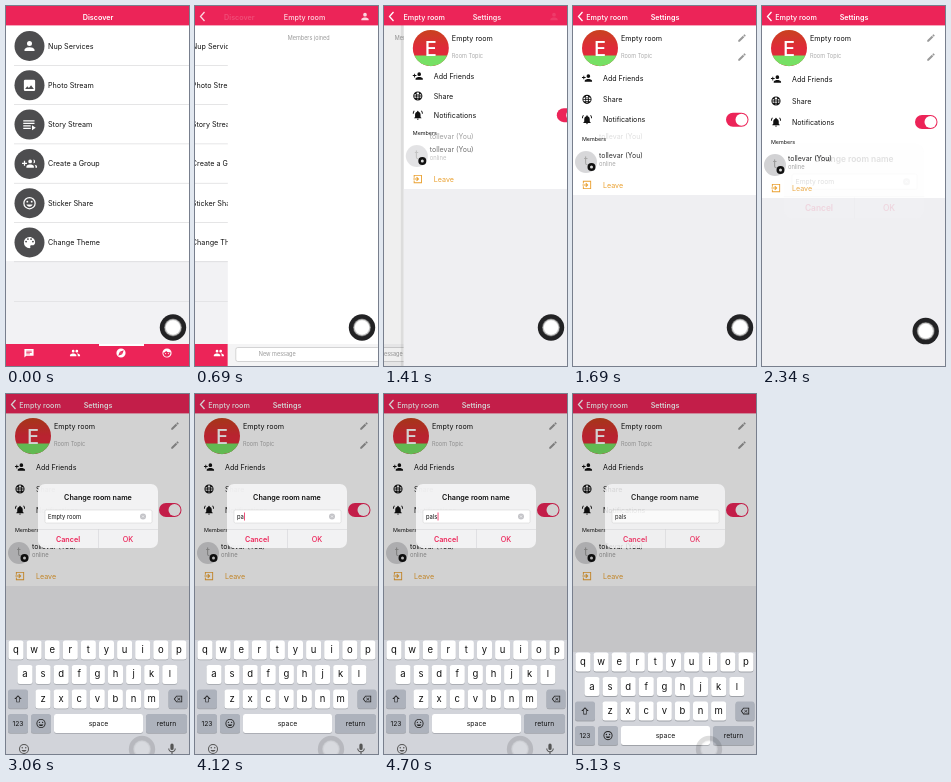
An HTML page for the animation above (5160 ms loop, 183 by 360 pixels).

```html
<!DOCTYPE html>
<html lang="en">
<head>
<meta charset="utf-8">
<title>Room settings</title>
<style>
html, body { margin: 0; width: 100%; height: 100%; overflow: hidden; background: #fff; }
svg { display: block; width: 100vw; height: 100vh; font-family: Inter, "Liberation Sans", sans-serif; }
</style>
</head>
<body>
<svg id="stage" viewBox="0 0 183 360"></svg>
<script>
const PINK = '#ec2458', LOOP = 5160;
const MEMBER = 'tollevar (You)';

// Icons on a 24-unit grid
const ICONS = {
  person: 'M12 12a4 4 0 100-8 4 4 0 000 8zm0 2c-2.7 0-8 1.3-8 4v2h16v-2c0-2.7-5.3-4-8-4z',
  image: 'M21 19V5a2 2 0 00-2-2H5a2 2 0 00-2 2v14a2 2 0 002 2h14a2 2 0 002-2zM8.5 13.5l2.5 3 3.5-4.5 4.5 6H5z',
  list: 'M2 5h18v2H2zM2 9h18v2H2zM2 13h12v2H2zM2 17h12v2H2zM16 13l6 4-6 4z',
  groupAdd: 'M8 10H5V7H3v3H0v2h3v3h2v-3h3zM13 11a3 3 0 100-6 3 3 0 000 6zm0 2c-2 0-6 1-6 3v2h12v-2c0-2-4-3-6-3zM18 11a3 3 0 000-6c1.3 2 1.3 4 0 6zm2 2.5c1 .7 1.5 1.5 1.5 2.5v2H24v-2c0-1.3-2-2.2-4-2.5z',
  smile: 'M12 2a10 10 0 100 20 10 10 0 000-20zm0 18a8 8 0 110-16 8 8 0 010 16zM8.5 11a1.5 1.5 0 100-3 1.5 1.5 0 000 3zm7 0a1.5 1.5 0 100-3 1.5 1.5 0 000 3zM12 17.5c2.3 0 4.3-1.5 5-3.5H7c.8 2 2.7 3.5 5 3.5z',
  palette: 'M12 3a9 9 0 000 18c.8 0 1.5-.7 1.5-1.5 0-1-1-1.5 0-2.5.3-.3.6-.5 1-.5H16a5 5 0 005-5c0-4.7-4-8.500-9-8.500zM6.5 12a1.5 1.5 0 110-3 1.5 1.5 0 010 3zm3-4a1.5 1.5 0 110-3 1.5 1.5 0 010 3zm5 0a1.5 1.5 0 110-3 1.5 1.5 0 010 3zm3 4a1.5 1.5 0 110-3 1.5 1.5 0 010 3z',
  chat: 'M2 3h20v15H6l-4 4zM6 7h12v1.5H6zM6 10h12v1.5H6zM6 13h8v1.5H6z',
  people: 'M8 11a3 3 0 100-6 3 3 0 000 6zm8 0a3 3 0 100-6 3 3 0 000 6zM8 13c-2.3 0-7 1.2-7 3.5V19h14v-2.5C15 14.2 10.3 13 8 13zm8 0c1.3 1 2 2 2 3.5V19h5v-2.5c0-2.3-4.7-3.5-7-3.5z',
  compass: 'M12 2a10 10 0 100 20 10 10 0 000-20zM6 18l3.5-8.5L18 6l-3.5 8.5zM12 11a1 1 0 100 2 1 1 0 000-2z',
  face: 'M12 2a10 10 0 100 20 10 10 0 000-20zm0 18a8 8 0 01-8-9c3 0 5-2 6-4 2 3 5 4 9.5 3.5A8 8 0 0112 20zM9 12a1.3 1.3 0 100 2.6A1.3 1.3 0 009 12zm6 0a1.3 1.3 0 100 2.6 1.3 1.3 0 000-2.6z',
  pencil: 'M3 17.5V21h3.5L17.5 10 14 6.5zM20.500 7a1 1 0 000-1.4l-2-2a1 1 0 00-1.5 0L15 5.500 18.500 9z',
  personAdd: 'M15 12a4 4 0 100-8 4 4 0 000 8zm-9-2V7H4v3H1v2h3v3h2v-3h3v-2zm9 4c-2.7 0-8 1.3-8 4v2h16v-2c0-2.7-5.3-4-8-4z',
  globe: 'M12 2a10 10 0 100 20 10 10 0 000-20zM5 8h3v3H4zm5-3.5h4L15 8H9zM10 11V9.5h4V11zM16 8h3l1 3h-4zM4 13h4l1 3H5zm6 0h4v3h-4zm6 0h4l-1 3h-3zm-6 5h4l-2 2z',
  bell: 'M12 22a2 2 0 002-2h-4a2 2 0 002 2zm6-6v-5c0-3-1.6-5.6-4.5-6.3V4a1.5 1.5 0 00-3 0v.7C7.6 5.4 6 8 6 11v5l-2 2v1h16v-1zM5 3L3.5 2C1.8 4 1 6 1 9h2c0-2.5.6-4.3 2-6zM19 3l1.5-1C22.2 4 23 6 23 9h-2c0-2.5-.6-4.3-2-6z',
  exit: 'M3 3h18v18H3v-6h2v4h14V5H5v4H3zM10 7l5 5-5 5-1.5-1.5L11 13H2v-2h9L8.5 8.5z',
  mic: 'M12 14a3 3 0 003-3V5a3 3 0 00-6 0v6a3 3 0 003 3zm5-3a5 5 0 01-10 0H5c0 3.5 2.5 6.5 6 7v3h2v-3c3.500-.5 6-3.500 6-7z',
  shift: 'M12 3L3 12h5v8h8v-8h5zM12 5.8L16.5 10.5H14.5V18.5h-5v-8H7.5z',
  erase: 'M8 4h14v16H8l-6-8zM9 6l-4.5 6L9 18h11V6zM11 8.5l3 3 3-3 1 1-3 2.7 3 2.8-1 1-3-3-3 3-1-1 3-2.8-3-2.7z'
};

const icon = (name, x, y, size, fill) =>
  `<path d="${ICONS[name]}" fill="${fill}" fill-rule="evenodd" transform="translate(${x - size / 2} ${y - size / 2}) scale(${size / 24})"/>`;
const text = (s, x, y, size = 7.2, fill = '#111', more = '') =>
  `<text x="${x}" y="${y + size * .36}" font-size="${size}" fill="${fill}" ${more}>${s}</text>`;
const mid = (s, x, y, size, fill, weight = 400, more = '') =>
  text(s, x, y, size, fill, `text-anchor="middle" font-weight="${weight}" ${more}`);
const rect = (x, y, w, h, fill, r = 0, more = '') =>
  `<rect x="${x}" y="${y}" width="${w}" height="${h}" rx="${r}" fill="${fill}" ${more}/>`;
const disc = (x, y, r, fill) => `<circle cx="${x}" cy="${y}" r="${r}" fill="${fill}"/>`;
const group = (id, body) => `<g id="${id}">${body}</g>`;

function discoverPage() {
  const rows = [['person', 'Nup Services'], ['image', 'Photo Stream'], ['list', 'Story Stream'],
    ['groupAdd', 'Create a Group'], ['smile', 'Sticker Share'], ['palette', 'Change Theme']];
  const tabs = ['chat', 'people', 'compass', 'face'];
  return rect(0, 0, 183, 360, '#f2f2f4') + rect(0, 19, 183, 236, '#fff') +
    rows.map(([name, label], i) => {
      const y = 40 + i * 39.3;
      return disc(23.5, y, 15, '#4d4d4f') + icon(name, 23.5, y, 15, '#fff') + text(label, 42, y) +
        rect(8, y + 19, 175, .6, '#d4d4d6');
    }).join('') + rect(8, 295, 175, .6, '#dcdcde') +
    rect(0, 338, 183, 22, PINK) + rect(93, 338, 45, 2, '#fff') +
    tabs.map((name, i) => icon(name, 23 + i * 46, 347, 11, '#fff')).join('');
}

const chatPage = () => rect(0, 0, 183, 360, '#fff') +
  text('Members joined', 60, 32, 5.5, '#999') +
  rect(0, 338, 183, 22, '#f4f4f5') +
  rect(8, 341.5, 144, 14, '#fff', 2, 'stroke="#bbb" stroke-width=".6"') +
  text('New message', 31, 348.5, 5.5, '#999') + icon('mic', 168, 348, 11, '#777') +
  rect(0, 0, 183, 360, '#000', 0, 'id="chatShade"');

function settingsPage() {
  const item = (y, body) => `<g class="item" data-y="${y}">${body}</g>`;
  const action = (name, label, y, fill) => item(y, icon(name, 14, y, 11, fill || '#111') + text(label, 30, y, 7.1, fill));
  return '<linearGradient id="rust" x2="0" y2="1"><stop stop-color="#c8421e"/><stop offset=".5" stop-color="#e02a3a"/></linearGradient>' +
    rect(-3, 19, 3, 341, '#000', 0, 'opacity=".08"') + rect(0, 0, 183, 360, '#fff') +
    item(192, rect(0, 192, 183, 178, '#efeff2')) +
    disc(27, 42, 18, 'url(#rust)') + '<path d="M10.5 49.500A18 18 0 0 0 43.5 49.500z" fill="#76e064"/>' +
    mid('E', 27, 42.5, 20, '#fff', 500) +
    text('Empty room', 48, 32) + text('Room Topic', 48, 50, 5.6, '#aaa') +
    icon('pencil', 169, 32, 10, '#999') + icon('pencil', 169, 51, 10, '#999') +
    action('personAdd', 'Add Friends', 73) + action('globe', 'Share', 95) + action('bell', 'Notifications', 116) +
    item(116, rect(153, 109, 22.5, 14, PINK, 7) + disc(168.5, 116, 6, '#fff')) +
    item(136, text('Members', 9, 136, 5.4)) +
    text(MEMBER, 26, 130, 7, '#777', 'id="ghost"') +
    item(152, group('member', disc(13, 159, 11, '#d2d2d4') + mid('t', 13, 158, 12, '#999') +
      text(MEMBER, 26, 152, 7) + text('online', 26, 161, 5.8, '#999')) +
      disc(18.5, 164, 4, '#111') + disc(18.5, 164, 1.5, '#ddd')) +
    action('exit', 'Leave', 182, '#eaa02f');
}

const header = () => rect(0, 0, 183, 19.4, PINK) +
  group('chevron', '<path d="M9.5 6L5.5 10.5L9.5 15" fill="none" stroke="#fff" stroke-width="1.3"/>') +
  mid('Discover', 0, 11, 7.2, '#fff', 600, 'id="discoverTitle"') +
  mid('Empty room', 0, 11, 7.2, '#fff', 500, 'id="chatTitle"') +
  mid('Settings', 0, 11, 7.2, '#fff', 600, 'id="settingsTitle"') +
  group('chatAction', icon('person', 170, 10.5, 11, '#fff'));

const dialog = () => rect(32, 90, 120, 64, '#f3f3f4', 7, 'opacity=".97"') +
  mid('Change room name', 92, 103, 7.2, '#111', 600) +
  rect(39, 116, 107, 13, '#fff', 1.5, 'stroke="#ccc" stroke-width=".5"') +
  text('', 42, 122.5, 5.8, '#111', 'id="field"') +
  rect(0, 118.5, .8, 8, PINK, 0, 'id="caret"') +
  group('clear', disc(137, 122.5, 3, '#c4c4c8') +
    '<path d="M136 121.5l2 2m0-2l-2 2" stroke="#fff" stroke-width=".6"/>') +
  rect(32, 135, 120, .5, '#cfcfd2') + rect(92, 135, .5, 19, '#cfcfd2') +
  mid('Cancel', 62, 145, 7.2, PINK, 600) + mid('OK', 122, 145, 7.2, PINK, 500);

function keyboard() {
  const GREY = '#adb2bc';
  const key = (x, y, w, fill, label) => rect(x - w / 2, y - 8.7, w, 19, '#a0a3a9', 2.5) +
    rect(x - w / 2, y - 9.5, w, 19, fill, 2.5) + label;
  const letters = (row, x, y) => [...row].map((c, i) =>
    key(x + i * 18.1, y, 15, '#fff', mid(c, x + i * 18.1, y - .5, 9.5, '#111'))).join('');
  return rect(0, 246, 183, 134, '#d2d4da') +
    letters('qwertyuiop', 10, 256) + letters('asdfghjkl', 19, 280.5) + letters('zxcvbnm', 37, 305) +
    key(12, 305, 20, GREY, icon('shift', 12, 305, 10, '#222')) +
    key(172, 305, 19, GREY, icon('erase', 172, 305, 10, '#222')) +
    key(12, 329.5, 20, GREY, mid('123', 12, 329.5, 6.8, '#111')) +
    key(35, 329.5, 20, GREY, icon('smile', 35, 329.5, 11, '#222')) +
    key(92.5, 329.5, 89, '#fff', mid('space', 92.5, 329.5, 6.8, '#111')) +
    key(160.5, 329.5, 41, GREY, mid('return', 160.5, 329.5, 6.8, '#111')) +
    icon('smile', 18, 355, 12, '#555') + icon('mic', 166, 355, 13, '#555');
}

const touchButton = () => disc(0, 0, 13.2, '#222224') + disc(0, 0, 9, '#666') +
  disc(0, 0, 8.3, '#ccc') + disc(0, 0, 7.2, '#fff');

const stage = document.getElementById('stage');
stage.innerHTML = group('discover', discoverPage()) + group('chat', chatPage()) +
  group('settings', settingsPage()) + group('header', header()) +
  rect(0, 0, 183, 360, '#000', 0, 'id="dim"') + group('dialog', dialog()) +
  group('keyboard', keyboard()) + group('touch', touchButton());

const el = {};
stage.querySelectorAll('[id]').forEach(node => el[node.id] = node);
const items = [...stage.querySelectorAll('.item')];

const ramp = (t, from, to) => Math.min(1, Math.max(0, (t - from) / (to - from)));
const easeOut = p => 1 - (1 - p) ** 2;
const mix = (a, b, p) => a + (b - a) * p;
const move = (node, x, y = 0) => node.setAttribute('transform', `translate(${x} ${y})`);
const fade = (node, value) => node.setAttribute('opacity', value);

// Field contents, each from its start time on
const TYPING = [[0, 'Empty room'], [3280, ''], [3770, 'p'], [4050, 'pa'], [4340, 'pal'], [4700, 'pals']];

function draw(t) {
  const toChat = easeOut(ramp(t, 420, 890));
  const toSettings = easeOut(ramp(t, 1120, 1552));
  const settle = easeOut(ramp(t, 1480, 1980));

  move(el.discover, -55 * toChat);
  move(el.chat, 183 * (1 - toChat) - 55 * toSettings);
  move(el.settings, 186 * (1 - toSettings));
  fade(el.chatShade, .07 * toSettings);

  move(el.discoverTitle, mix(92, 34, toChat));
  fade(el.discoverTitle, 1 - toChat);
  move(el.chatTitle, mix(mix(190, 92, toChat), 34, toSettings));
  fade(el.chatTitle, toChat);
  move(el.settingsTitle, mix(195, 92, toSettings));
  fade(el.settingsTitle, toSettings);
  fade(el.chevron, toChat);
  fade(el.chatAction, toChat * (1 - toSettings));

  for (const node of items) {
    const squeeze = Math.min(9, 3 + (node.dataset.y - 73) * .09);
    move(node, 0, -squeeze * (1 - settle));
  }
  fade(el.ghost, .7 * (1 - settle));
  fade(el.member, mix(.6, 1, settle));

  // The alert and keyboard rise together
  const open = t >= 2340;
  const rest = open ? Math.exp((2340 - t) / 65) : 1;
  const shown = open ? mix(.12, 1, ramp(t, 2340, 2470)) : 0;
  const closing = ramp(t, 5060, 5160);
  const zoom = 1 + .17 * rest;
  el.dialog.setAttribute('transform',
    `translate(92 ${122 + 54 * rest}) scale(${zoom}) translate(-92 -122)`);
  fade(el.dialog, shown * (1 - .14 * closing));
  fade(el.dim, .175 * ramp(t, 2340, 2500));
  move(el.keyboard, 0, 118 * rest + 24 * closing ** 2);

  const value = TYPING.filter(([start]) => t >= start).pop()[1];
  if (el.field.textContent !== value) el.field.textContent = value;
  el.caret.setAttribute('x', 42.3 + el.field.getComputedTextLength());
  fade(el.caret, (t > 2400 && t < 2920) || (t > 3200 && t < 4990) ? 1 : 0);
  fade(el.clear, value && t < 4990 ? 1 : 0);

  const drift = open ? ramp(t, 2324, 2484) : 0;
  move(el.touch, mix(167, 136, drift), mix(321.5, 355, drift));
  fade(el.touch, mix(1, .15, ramp(t, 2700, 3060)));
}

function tick() {
  draw(performance.now() % LOOP);
  requestAnimationFrame(tick);
}
tick();
</script>
</body>
</html>
```
